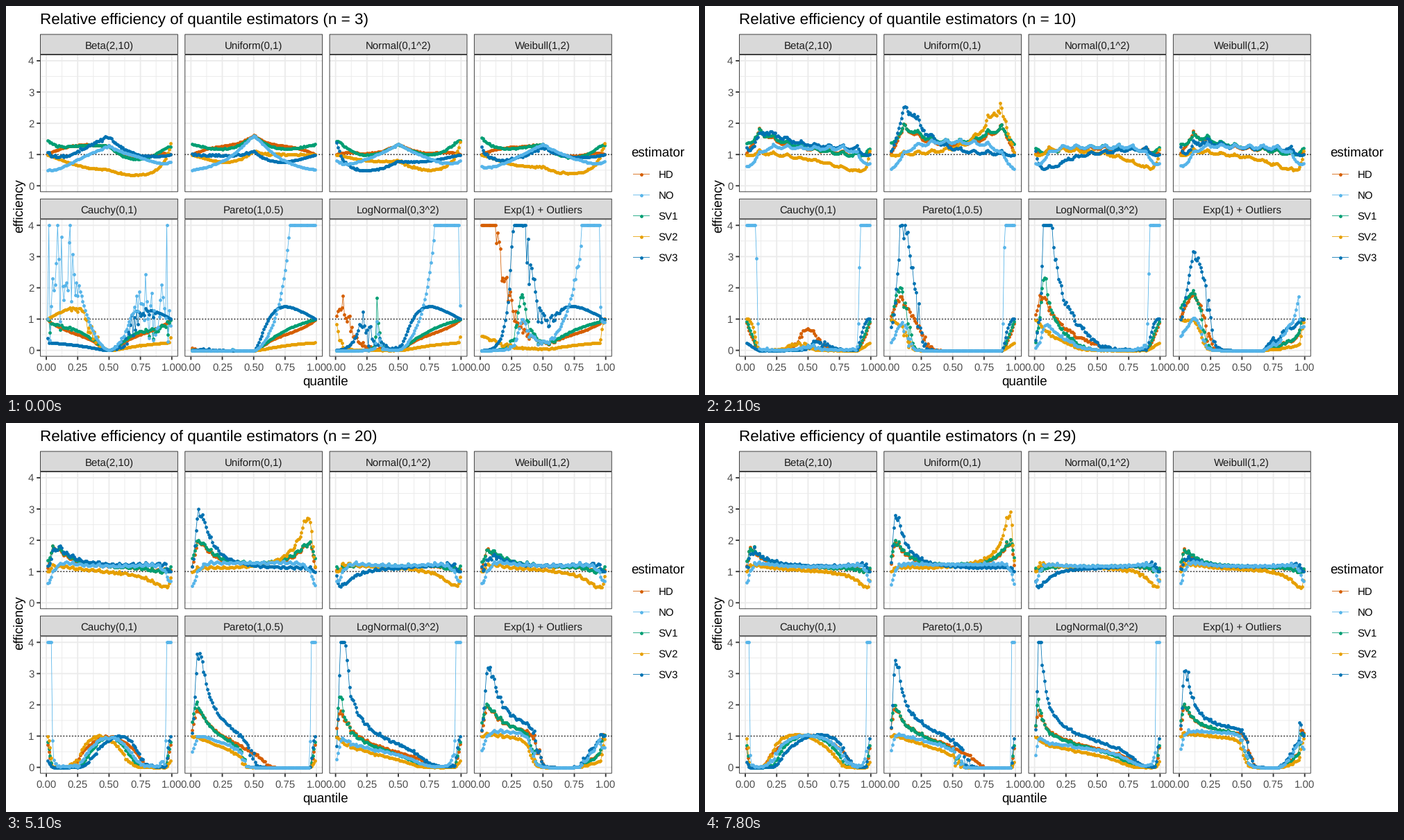
Write a matplotlib script that moves like this. It is 998 px wide and 561 px high and loops after 8000 ms.

```python
import math

import matplotlib.pyplot as plt
import numpy as np
from matplotlib.animation import FuncAnimation
from matplotlib.patches import Rectangle

W, H, DPI = 998, 561, 64
PT = 72 / DPI  # points per pixel
plt.rcParams.update({"font.family": "Liberation Sans", "path.snap": False,
                     "text.hinting": "none"})

COLORS = {"HD": "#D55E00", "NO": "#56B4E9", "SV1": "#009E73",
          "SV2": "#E69F00", "SV3": "#0072B2"}
DRAW_ORDER = ["HD", "SV1", "SV2", "SV3", "NO"]
PROBS = np.arange(1, 100) / 100
SIZES = range(3, 30)
BATCHES, BATCH_SIZE, PICKED = 60, 400, 24


# ---- distributions, given by their quantile functions ----
def inverse(cdf, x):
    table = cdf(x)
    return lambda u: np.interp(u, table, x)


normal = inverse(np.vectorize(lambda x: math.erfc(-x / math.sqrt(2)) / 2),
                 np.linspace(-6, 6, 3001))
QUANTILES = {
    "Beta(2,10)": inverse(lambda x: 1 - (1 - x) ** 10 * (1 + 10 * x),
                          np.linspace(0, 1, 4001)),
    "Uniform(0,1)": lambda u: u,
    "Normal(0,1^2)": normal,
    "Weibull(1,2)": lambda u: np.sqrt(-np.log1p(-u)),
    "Cauchy(0,1)": lambda u: np.tan(np.pi * (u - 0.5)),
    "Pareto(1,0.5)": lambda u: 1 / (1 - u) ** 2,
    "LogNormal(0,3^2)": lambda u: np.exp(3 * normal(u)),
    "Exp(1) + Outliers": inverse(
        lambda x: 0.95 * (1 - np.exp(-x)) + 0.05 * x / 10000,
        np.append(np.linspace(0, 20, 4001), 10000)),
}


# ---- estimators, as weights of the order statistics ----
def hd_weights(n):
    nodes, gauss = np.polynomial.legendre.leggauss(16)
    t, gauss, h = (nodes + 1) / 2, gauss / 2, 1 / n
    a = (n + 1) * PROBS[:, None]
    b = n + 1 - a

    def edge(a, b):
        return (h ** a / a)[:, 0] * ((1 - h * t ** (1 / a)) ** (b - 1) @ gauss)

    x = (np.arange(1, n - 1)[:, None] + t) / n
    middle = x ** (a[..., None] - 1) * (1 - x) ** (b[..., None] - 1) @ gauss * h
    w = np.column_stack([edge(a, b), middle, edge(b, a)])
    return w / w.sum(axis=1, keepdims=True)


def all_weights(n):
    p = PROBS[:, None]
    binom = np.column_stack([math.comb(n, i) * PROBS ** i * (1 - PROBS) ** (n - i)
                             for i in range(n + 1)])
    left, right = binom[:, :-1], binom[:, 1:]
    first, last = binom[:, :1], binom[:, -1:]
    base = np.clip(1 - np.abs((n - 1) * p - np.arange(n)), 0, None)

    sv1 = (left + right) / 2
    sv1[:, :3] += first / 2 * [1, 1, -1]
    sv1[:, -3:] += last / 2 * [-1, 1, 1]
    sv2 = left.copy()
    sv2[:, -2:] += last * [-1, 2]
    sv3 = right.copy()
    sv3[:, :2] += first * [2, -1]
    no = (1 - p) * left + p * right
    no[:, :3] += first * np.hstack([3 * p - 1, 2 - 3 * p, p - 1])
    no[:, -3:] += last * np.hstack([-p, 3 * p - 1, 2 - 3 * p])
    return np.vstack([base, hd_weights(n), sv1, sv2, sv3, no])


def efficiencies(n):
    """Median relative efficiency, shaped (panel, probability, estimator)."""
    rng = np.random.default_rng(n)
    uniform = np.sort(rng.random((BATCHES, BATCH_SIZE, n)), axis=-1)
    weights = all_weights(n)
    count = len(PROBS)
    result = []
    for quantile in QUANTILES.values():
        x = quantile(uniform)
        second = x.transpose(0, 2, 1) @ x / BATCH_SIZE
        mean = x.mean(axis=1) @ weights.T
        true = np.tile(quantile(PROBS), 6)
        mse = ((weights @ second) * weights).sum(axis=-1) - 2 * true * mean + true ** 2
        mse = mse.reshape(BATCHES, 6, count)
        ratio = mse[:, :1] / mse[:, 1:]
        pick = rng.integers(BATCHES, size=(count, PICKED))
        chosen = ratio[pick, :, np.arange(count)[:, None]]
        result.append(np.clip(np.median(chosen, axis=1), 0, 4))
    return np.array(result)


CURVES = [efficiencies(n) for n in SIZES]

# ---- static layout, in pixels ----
PANEL_W, PANEL_H, STRIP, GAP = 198.8, 198.3, 29.5, 9.5
UNIT_X, UNIT_Y = PANEL_W / 1.1, PANEL_H / 4.4
CORNERS = [(49 + (PANEL_W + GAP) * (k % 4), 70 + (PANEL_H + GAP + STRIP) * (k // 4))
           for k in range(8)]
THIN, THICK = 0.92, 1.85
SMALL, MEDIUM, LARGE = 14.97, 18.71, 22.45


def to_x(k, p):
    return CORNERS[k][0] + UNIT_X * (p + 0.05)


def to_y(k, value):
    return CORNERS[k][1] + UNIT_Y * (4.2 - value)


fig = plt.figure(figsize=(W / DPI, H / DPI), dpi=DPI, facecolor="white")
ax = fig.add_axes([0, 0, 1, 1])
ax.set(xlim=(0, W), ylim=(H, 0))
ax.axis("off")


def line(x, y, color, width, z, **style):
    style = {"solid_capstyle": "butt", **style}
    return ax.plot(x, y, color=color, lw=width * PT, zorder=z, **style)[0]


def dots(x, y, color, z):
    return ax.plot(x, y, "o", color=color, ms=4.8 * PT, mew=0, zorder=z)[0]


def box(x, y, height, fill):
    """Box as wide as a panel whose outline lies just inside its edges."""
    ax.add_patch(Rectangle((x + THIN / 2, y + THIN / 2), PANEL_W - THIN, height - THIN,
                           fc=fill, ec="#333333", lw=THIN * PT, zorder=10))


def label(x, y, text, size, color="black", **style):
    style = {"ha": "center", "va": "baseline", **style}
    return ax.text(x, y, text, fontsize=size * PT, color=color, zorder=20, **style)


for k, (name, (x0, y0)) in enumerate(zip(QUANTILES, CORNERS)):
    x1, y1 = x0 + PANEL_W, y0 + PANEL_H
    for i in range(9):
        width = THIN if i % 2 else THICK
        x, y = to_x(k, i / 8), to_y(k, i / 2)
        line([x, x], [y0, y1], "#EBEBEB", width, 1)
        line([x0, x1], [y, y], "#EBEBEB", width, 1)
    one = to_y(k, 1)
    line([x0, x1], [one, one], "black", 1.4, 2, ls=(0, (1, 2)), dash_capstyle="butt")
    box(x0, y0 - STRIP, STRIP, "#D9D9D9")
    box(x0, y0, PANEL_H, "none")
    label(x0 + PANEL_W / 2, y0 - 8.3, name, SMALL, "#1A1A1A")
    if k % 4 == 0:
        for v in range(5):
            y = to_y(k, v)
            line([x0 - 4.75, x0], [y, y], "#333333", THICK, 9)
            label(40.5, y + 5.4, str(v), SMALL, "#4D4D4D", ha="right")
    if k >= 4:
        for i in range(5):
            x = to_x(k, i / 4)
            line([x, x], [y1, y1 + 4.75], "#333333", THICK, 9)
            label(x, 526.3, f"{i / 4:.2f}", SMALL, "#4D4D4D")

title = label(48.8, 26.8, "", LARGE, ha="left")
label(460.5, 547.5, "quantile", MEDIUM)
label(19.8, 288, "efficiency", MEDIUM, rotation=90, va="center")
label(900, 216.5, "estimator", MEDIUM, ha="left")
for i, (name, color) in enumerate(COLORS.items()):
    y = 242.5 + 30 * i
    line([903, 927], [y, y], color, 0.8, 5)
    dots([915], [y], color, 6)
    label(939.5, y + 5.7, name, SMALL, ha="left")

# ---- moving curves: one path per estimator, broken between panels ----
PATH_X = np.concatenate([np.append(to_x(k, PROBS), np.nan) for k in range(8)])
paths = [line(PATH_X, PATH_X, COLORS[e], 0.8, 4) for e in DRAW_ORDER]
points = [dots(PATH_X, PATH_X, COLORS[e], 6) for e in DRAW_ORDER]


def update(frame):
    step = frame // 3
    title.set_text(f"Relative efficiency of quantile estimators (n = {SIZES[step]})")
    for e, (path, marks) in enumerate(zip(paths, points)):
        y = np.concatenate([np.append(to_y(k, CURVES[step][k, :, e]), np.nan)
                            for k in range(8)])
        path.set_ydata(y)
        marks.set_ydata(y)
    return [title, *paths, *points]


anim = FuncAnimation(fig, update, frames=80, interval=100, repeat=True, repeat_delay=0)
plt.show()
```
